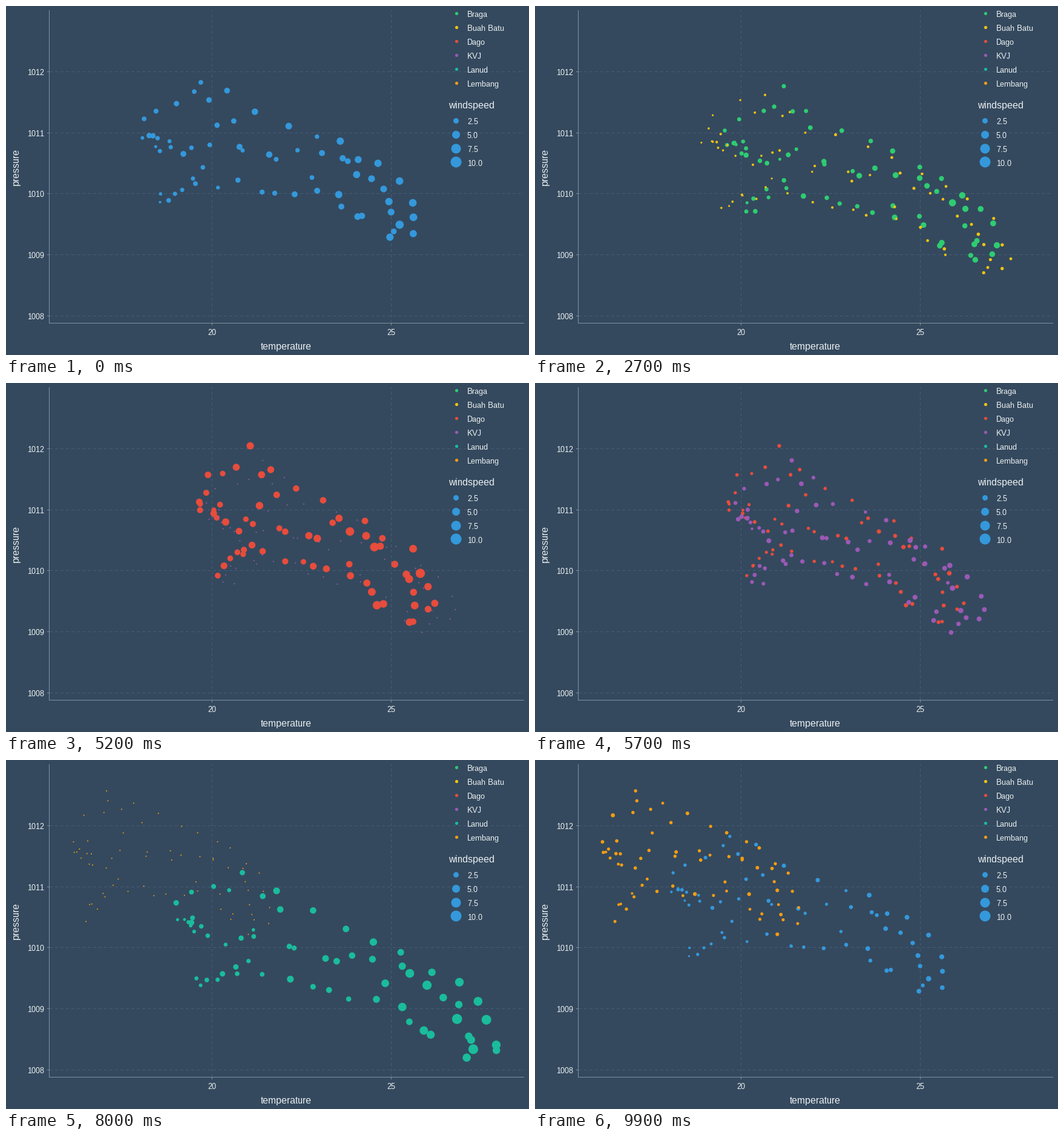
Write a matplotlib script that moves like this. It is 864 by 576 pixels and loops after 10 s.

```python
import numpy as np
import matplotlib.pyplot as plt
from matplotlib.animation import FuncAnimation

W, H, DPI = 864, 576, 72
BG, GRID, AXIS, TEXT = "#34495e", "#465c77", "#7f929f", "#ecf0f1"
BLUE, GREEN, YELLOW, RED = "#3498db", "#2ecc71", "#f1c40f", "#e74c3c"
PURPLE, TEAL, ORANGE = "#9b59b6", "#1abc9c", "#f39c12"
DOT = 1.0                                # radius of a point with zero size
STARTS = (8, 23, 38, 52, 66, 80, 94)     # first frame of each transition
STEPS = 6
HOURS = 66

# Two days of weather as (temperature 0..1, pixels off the trend line)
TRACK = [
    (.06, -18), (.18, -130), (.35, -106), (.54, -97), (.69, -92), (.83, -80),
    (.95, -52), (1, -10), (.96, 25), (.73, 22), (.71, -3), (.55, 12),
    (.45, 23), (.34, 22), (.19, 48), (.08, 76), (.08, 102), (.15, 56),
    (.24, 20), (.12, 5), (.06, 8), (.04, -9), (0, -43), (.22, -110),
    (.32, -76), (.21, -25), (.42, -30), (.56, -60), (.70, -70), (.74, -55),
    (.86, -54), (.88, -24), (.93, 2), (.87, 52), (.60, -30), (.38, -32),
    (.10, -5), (.04, -8), (.01, -5),
]

# colour, x cool, x hot, trend y cool, trend y hot, radius cool, radius hot
SITES = (
    (BLUE, 222, 685, 220, 358, 3.3, 6.2),
    (GREEN, 315, 767, 230, 405, 4.3, 6.6),
    (YELLOW, 275, 788, 225, 425, 3.5, 6.6),
    (RED, 320, 710, 205, 375, 4.9, 6.3),
    (PURPLE, 330, 741, 222, 392, 4.9, 6.3),
    (TEAL, 280, 815, 265, 475, 3.3, 7.2),
    (ORANGE, 110, 440, 155, 255, 4.8, 4.8),
)

plt.rcParams.update({"font.family": "Liberation Sans",
                     "text.hinting": "native", "text.hinting_factor": 1})
fig = plt.figure(figsize=(W / DPI, H / DPI), dpi=DPI, facecolor=BG)
ax = fig.add_axes([0, 0, 1, 1])
ax.set_xlim(0, W)
ax.set_ylim(H, 0)
ax.axis("off")


def line(x, y, color=AXIS, **kw):
    ax.plot(x, y, color=color, lw=1, antialiased=False, snap=False,
            solid_capstyle="butt", dash_capstyle="butt", **kw)


def label(x, y, text, size=13, ha="left", **kw):
    ax.text(x, y, text, color=TEXT, fontsize=size, ha=ha,
            va="center_baseline", **kw)


def dots(x, y, r, color, z):
    size = (2 * np.asarray(r, float)) ** 2
    return ax.scatter(x, y, s=size, c=color, linewidths=0, snap=False,
                      zorder=z)


def make_site(seed, color, x0, x1, y0, y1, r0, r1):
    """Fit the shared track to one site, with its own small scatter."""
    rng = np.random.default_rng(seed)
    keys = np.arange(len(TRACK))
    temp, off = (np.interp(np.linspace(0, keys[-1], HOURS), keys, v)
                 for v in zip(*TRACK))
    x = x0 + (x1 - x0) * temp + rng.normal(0, 5, HOURS)
    y = y0 + (y1 - y0) * temp + off + rng.normal(0, 5, HOURS)
    r = r0 + (r1 - r0) * temp + rng.normal(0, 0.6, HOURS)
    r = np.clip(r, 2, 8.3)
    return dots(x, y, r, color, 5 + seed), r


def draw_axes():
    dash = dict(color=GRID, linestyle=(0, (4, 4)), zorder=1)
    for i in range(5):
        y = int(108.6 + 100.6 * i) + 0.5
        line([72, 856], [y, y], **dash)
        line([68, 71], [y, y])
        label(63, y + 0.5, str(1012 - i), ha="right")
    for x, t in ((340.5, "20"), (636.5, "25")):
        line([x, x], [523, 7], **dash)
        line([x, x], [524, 527])
        label(x, 538, t, ha="center")
    line([71.5, 71.5], [7, 524])
    line([71, 856], [523.5, 523.5])
    label(463, 561, "temperature", 16, "center")
    ax.text(16, 265, "pressure", color=TEXT, fontsize=16, rotation=90,
            ha="center", va="center")


def draw_legend():
    sites = (("Braga", GREEN), ("Buah Batu", YELLOW), ("Dago", RED),
             ("KVJ", PURPLE), ("Lanud", TEAL), ("Lembang", ORANGE))
    for i, (name, color) in enumerate(sites):
        y = 12.3 + 22.9 * i
        dots([743.5], [y], [2.6], color, 20)
        label(762, y + 0.8, name, zorder=20)
    label(731, 162.5, "windspeed", 16, zorder=20)
    for i, r in enumerate((4.5, 6.5, 8, 9)):
        y = 188.7 + 22.9 * i
        dots([743.3], [y], [r], BLUE, 20)
        label(762, y + 1.7, f"{2.5 * (i + 1):.1f}", zorder=20)


draw_axes()
draw_legend()
series = [make_site(i, *site) for i, site in enumerate(SITES)]


def show(i, amount):
    points, r = series[i]
    points.set_visible(True)
    points.set_sizes((2 * (DOT + (r - DOT) * amount)) ** 2)


def update(frame):
    for points, _ in series:
        points.set_visible(False)
    begun = sum(s <= frame for s in STARTS)
    p = (frame - STARTS[begun - 1]) / STEPS if begun else 1
    if p < 1:
        ease = p ** 3
        show(begun - 1, 1 - ease)
        show(begun % len(series), ease)
    else:
        show(begun % len(series), 1)
    return [points for points, _ in series]


anim = FuncAnimation(fig, update, frames=100, interval=100, repeat=True,
                     repeat_delay=0, blit=False)
plt.show()
```
